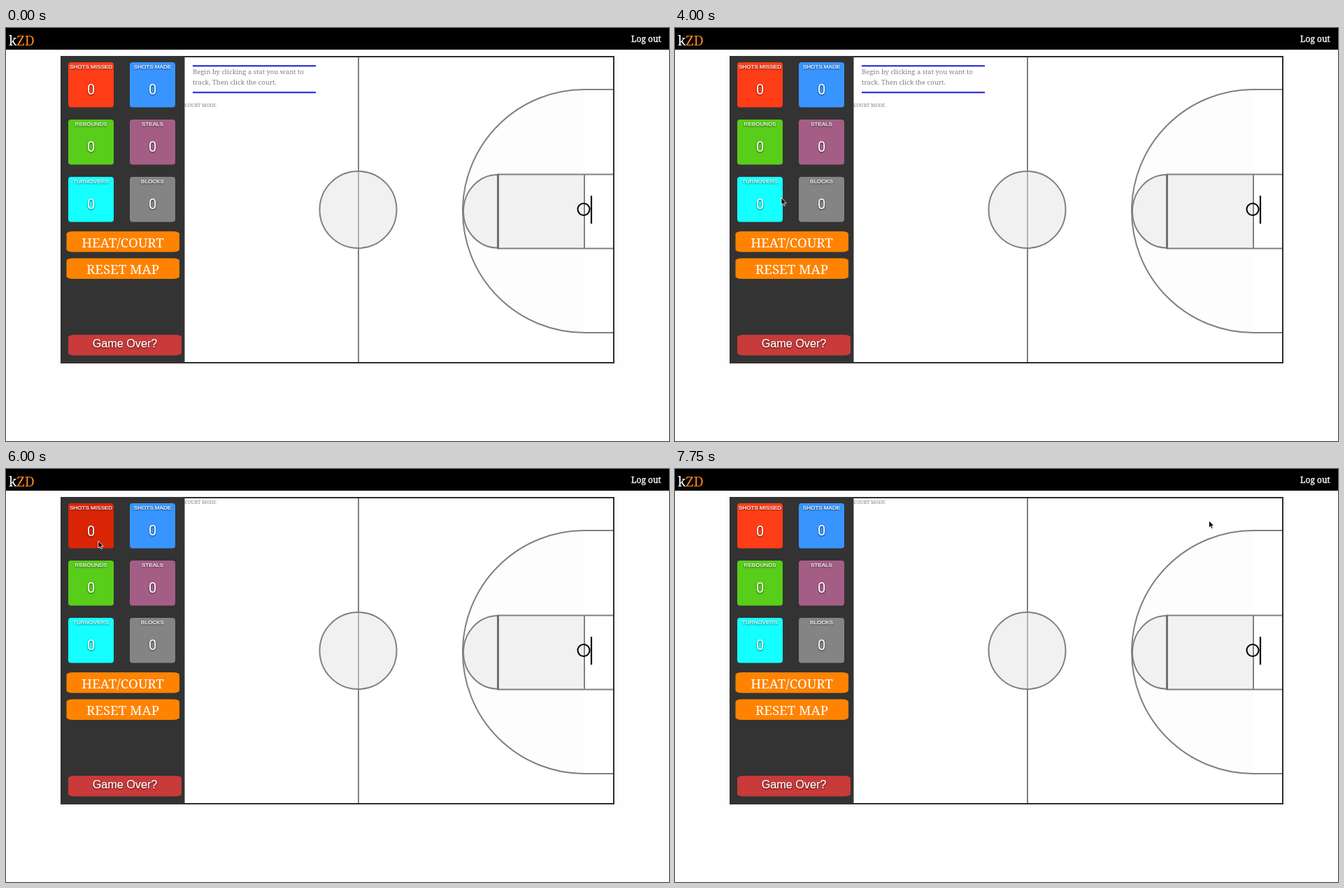
These frames come from a looping animation (948 by 591 pixels, 8000 ms). An HTML page:

```html
<!DOCTYPE html>
<html lang="en">
<head>
<meta charset="utf-8">
<title>Shot tracker</title>
<style>
  html, body { margin: 0; width: 100%; height: 100%; overflow: hidden; background: #fefefe; }
  svg { display: block; width: 100%; height: 100%; }
  text { font-family: "Noto Serif", serif; fill: #fff; }
  .mid { text-anchor: middle; }
  .sans { font-family: "Liberation Sans", Arial, sans-serif; stroke: #fff; stroke-width: .2; }
  .num { font: 20px Roboto, sans-serif; }
  .shade { filter: drop-shadow(0 1px 1px rgba(0, 0, 0, .65)); }
  .grey { fill: #808080; }
  .line { fill: none; stroke: #808080; stroke-width: 2; }
  .area { fill: #f1f1f1; }
</style>
</head>
<body>
<svg viewBox="0 0 948 591">
  <rect width="948" height="31"/>
  <text x="4" y="25" font-size="19.4">k<tspan fill="#ff8a1c">ZD</tspan></text>
  <text x="894" y="20" font-size="12" stroke="#fff" stroke-width=".35">Log out</text>

  <g id="court">
    <rect x="79" y="41" width="790" height="438" fill="#fff" stroke="#302c2f" stroke-width="2"/>
    <path d="M504 42V478" class="line"/>
    <circle cx="503.5" cy="260" r="55" fill="#e4e4e4" fill-opacity=".5"/>
    <circle cx="503.5" cy="260" r="55" class="line"/>
    <path d="M827 88A174 174 0 0 0 827 436Z" fill="#fdfdfd"/>
    <path d="M868 88H827A174 174 0 0 0 827 436H868" class="line"/>
    <path d="M703 210A49 52.3 0 0 0 703 314.6Z" class="area"/>
    <path d="M703 210A49 52.3 0 0 0 703 314.6" class="line"/>
    <rect x="704" y="209.5" width="123" height="106" class="area"/>
    <path d="M868 209.5H703V315.5H868M827 209V316" class="line"/>
    <path d="M703.5 209V316" stroke="#707070" stroke-width="3"/>
    <circle cx="826" cy="259.5" r="8.5" fill="none" stroke="#000" stroke-width="2"/>
    <path d="M837 240V280" stroke="#000" stroke-width="2.2"/>
  </g>

  <g id="hint">
    <path d="M267 54.2H443M267 92.3H443" stroke="#1c1cd8" stroke-width="2"/>
    <text x="267" y="66" font-size="9.47" class="grey">Begin by clicking a stat you want to</text>
    <text x="267" y="81" font-size="9.47" class="grey">track. Then click the court.</text>
  </g>
  <text id="mode" x="255.5" font-size="6.85" class="grey">COURT MODE</text>

  <rect x="78" y="40" width="177.5" height="439.5" fill="#333"/>
  <g id="tiles"></g>
  <g id="buttons">
    <rect x="86.5" y="291" width="161.5" height="29.5" rx="9" ry="3.5" fill="#ff8300"/>
    <text x="167" y="313.5" font-size="18.7" class="mid">HEAT/COURT</text>
    <rect x="86.5" y="329.5" width="161.5" height="29.5" rx="9" ry="3.5" fill="#ff8300"/>
    <text x="167" y="352" font-size="18.7" class="mid">RESET MAP</text>
    <rect x="89" y="439" width="162" height="29.5" rx="9" ry="3.5" fill="#c93a3a"/>
    <text x="170" y="457" font-size="16.2" class="mid sans shade">Game Over?</text>
  </g>

  <path id="cursor" d="M0 0V10L2.3 7.9L3.9 11.4L5.6 10.7L4.1 7.3H7.2Z" fill="#000" stroke="#fff" stroke-width=".8"/>
</svg>
<script>
const LOOP = 8000;
const $ = id => document.getElementById(id);

// label, colour, hover colour
const stats = [
  ["SHOTS MISSED", "#ff3d17", "#d92505"],
  ["SHOTS MADE", "#3895ff", "#0060d6"],
  ["REBOUNDS", "#58cd1a", "#40a00e"],
  ["STEALS", "#a45e86", "#824768"],
  ["TURNOVERS", "#14ffff", "#00a6a6"],
  ["BLOCKS", "#848484", "#666666"]
];
const [MISSED, MADE, REBOUNDS, , TURNOVERS] = stats.keys();

// time, pointer x, pointer y, hovered tile; time alone hides the pointer
const track = [
  [0], [500, 461.5, -2.5], [750],
  [1750, 147, 48.5], [2000, 155, 59], [2250, 161, 68], [2500, 165, 73.5],
  [3000, 168, 92], [3250, 170, 128], [3500, 166, 176], [3750, 158, 220], [4000, 152, 243],
  [4250, 150, 242, TURNOVERS], [4500, 144, 235, TURNOVERS], [4750, 137, 225, TURNOVERS],
  [5000, 131, 168, REBOUNDS], [5250, 128.5, 108.5, MISSED], [5500, 128.5, 104.5, MISSED],
  [6000, 132, 103, MISSED], [6250, 182, 104, MADE], [6500, 237, 104, MADE],
  [6750, 400, 86], [7000, 592, 68], [7250, 690, 68], [7500, 742, 71], [7750, 763.5, 74]
];

const tiles = stats.map(([label, color], i) => {
  const x = 89 + i % 2 * 88, y = 49 + (i >> 1) * 82;
  $("tiles").insertAdjacentHTML("beforeend", `<g>
    <rect x="${x}" y="${y}" width="65" height="64.5" rx="4" fill="${color}"/>
    <g class="shade mid">
      <text x="${x + 32.5}" y="${y + 8.5}" font-size="8.1" class="sans">${label}</text>
      <text x="${x + 32.5}" y="${y + 46}" class="num">0</text>
    </g></g>`);
  const [box, caption] = $("tiles").lastElementChild.children;
  return { box, caption };
});

function draw(t) {
  const [, x, y, hover] = track.findLast(step => step[0] <= t);
  const picked = t >= 6000;

  $("cursor").style.display = x === undefined ? "none" : "";
  if (x !== undefined) $("cursor").setAttribute("transform", `translate(${x} ${y})`);

  $("hint").style.display = picked ? "none" : "";
  $("mode").setAttribute("y", picked ? 49.5 : 112.7);

  tiles.forEach(({ box, caption }, i) => {
    const active = i === hover;
    const sunk = active || (picked && i === MISSED);
    box.setAttribute("fill", stats[i][active ? 2 : 1]);
    caption.setAttribute("transform", `translate(0 ${sunk ? 0.6 : 0})`);
  });
}

const start = performance.now();
function tick() {
  draw((performance.now() - start) % LOOP);
  requestAnimationFrame(tick);
}
tick();
</script>
</body>
</html>
```
